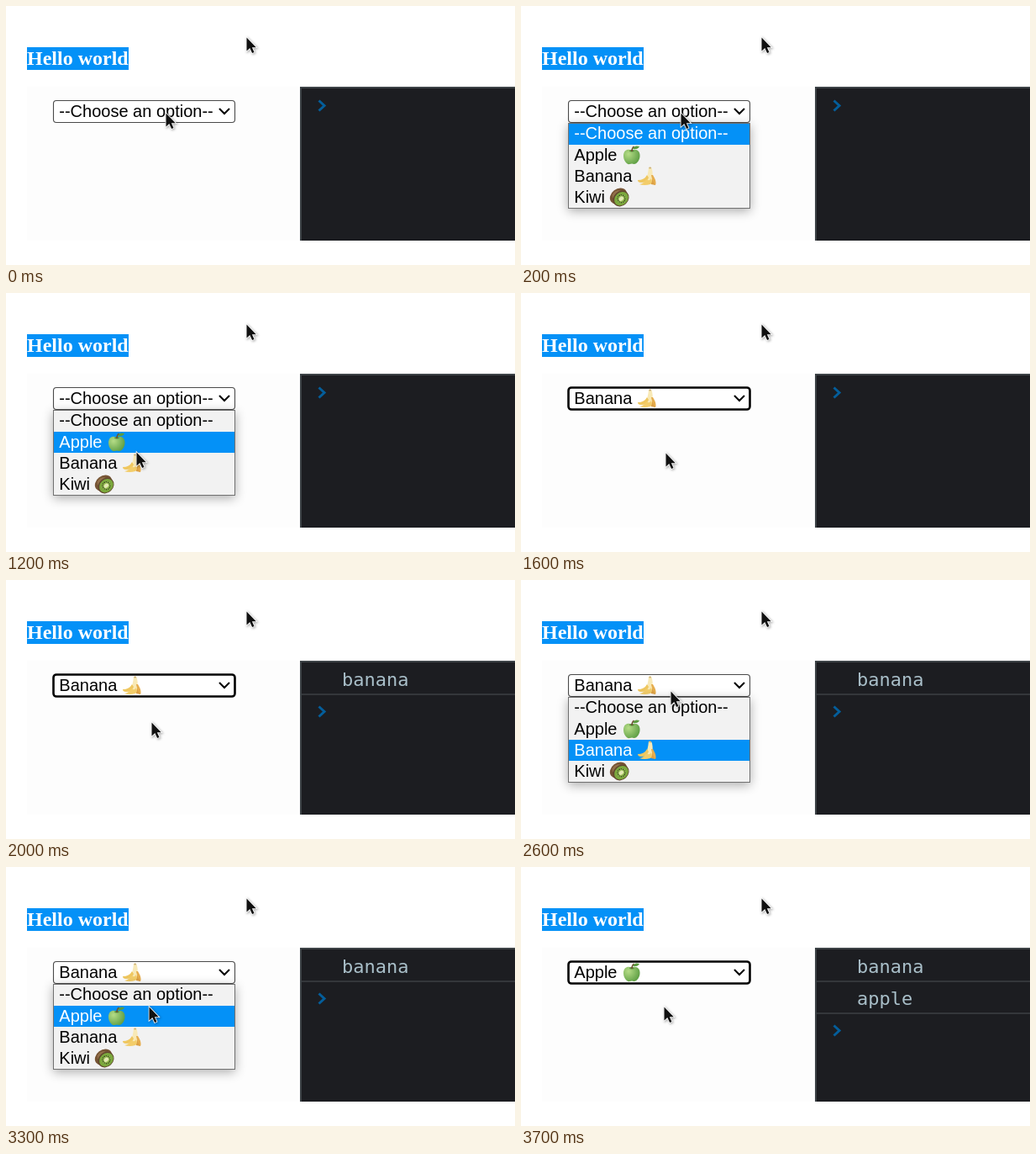
An HTML page with a canvas for the animation above (4.1 s loop, 606x308 px).

```html
<!DOCTYPE html>
<html lang="en">
<head>
<meta charset="utf-8">
<title>Select demo</title>
<style>
html, body { margin: 0; width: 100%; height: 100%; overflow: hidden; background: #fff; }
canvas { display: block; }
</style>
</head>
<body>
<canvas id="stage" width="606" height="308"></canvas>
<script>
const ctx = document.getElementById('stage').getContext('2d');
const LOOP = 4100;
const BLUE = '#0491f7';
const SANS = '20px "Liberation Sans", Arial, sans-serif';
const MONO = '22px "DejaVu Sans Mono", monospace';
const SERIF = 'bold 24px "Liberation Serif", "Times New Roman", serif';

// Pointer tip: time, x, y
const pointer = [
  [0, 190, 127], [400, 189, 130], [500, 186, 138], [600, 180, 146],
  [700, 173, 153], [800, 165, 172], [900, 160, 193], [1100, 156, 217],
  [1200, 155, 189], [1300, 172, 190], [2000, 173, 169], [2100, 175, 155],
  [2200, 177, 141], [2300, 178, 132], [2700, 178, 131], [2900, 174, 160],
  [3000, 176, 141], [3300, 170, 166]
];
// Highlighted option: time, index (-1 = list closed)
const hover = [
  [0, -1], [200, 0], [800, 1], [900, 2], [1100, 3], [1200, 1], [1300, 2],
  [1600, -1], [2500, 2], [3300, 1], [3600, -1]
];
const chosen = [[0, 0], [1600, 2], [3600, 1]];
const logs = [[1700, 'banana'], [3700, 'apple']];

const options = [
  { text: '--Choose an option--' },
  { text: 'Apple', icon: apple, iconX: 120 },
  { text: 'Banana', icon: banana, iconX: 138 },
  { text: 'Kiwi', icon: kiwi, iconX: 105 }
];
const baselines = [158, 184, 209, 234];

const at = (keys, t) => keys.filter(k => k[0] <= t).pop();

function rect(x, y, w, h, color) {
  ctx.fillStyle = color;
  ctx.fillRect(x, y, w, h);
}

function text(str, x, y, font, color) {
  ctx.font = font;
  ctx.fillStyle = color;
  ctx.fillText(str, x, y);
}

function shape(d, fill) {
  ctx.fillStyle = fill;
  ctx.fill(new Path2D(d));
}

function line(d, color, width) {
  ctx.strokeStyle = color;
  ctx.lineWidth = width;
  ctx.stroke(new Path2D(d));
}

function oval(x, y, rx, ry, turn, color) {
  ctx.beginPath();
  ctx.ellipse(x, y, rx, ry, turn, 0, 7);
  ctx.fillStyle = color;
  ctx.fill();
}

function glow(x, y, r, inner, outer) {
  const g = ctx.createRadialGradient(x, y, 0, x, y, r);
  g.addColorStop(0, inner);
  g.addColorStop(1, outer);
  return g;
}

// Icons sit in a 24 x 24 box
function apple() {
  shape('M12 7C8 4 2 6 2 13C2 19 6 24 9.500 23Q12 22 14.500 23C18 23 22 18 21.500 12C21 6 16 5 12 7Z',
    glow(8, 11, 14, '#b5dc86', '#5f9f45'));
  oval(12, 7.3, 3, 1.2, 0, '#5c9440');
  line('M12 8Q12 4 14.500 2', '#6d4c32', 1.6);
  shape('M13 5Q15 0 21 2Q19 6 13 5Z', '#5a9a3f');
}

function banana() {
  shape('M13 12L22 17L22 23L17 22Z', '#dca045');
  shape('M14 2Q17 1 18 4Q20 13 17 20Q14 23 9 21Q13 13 14 2Z', '#f8e9b6');
  shape('M12 11Q9 17 1 17Q1 20 5 20Q12 20 14 14Z', '#efc75f');
  shape('M11 16Q9 21 3 22Q9 24 16 22Q19 20 17 15Q15 19 11 16Z', '#f3cd69');
  shape('M17 11Q18 18 22 23Q24 19 19 11Z', '#e6ad4d');
  oval(15.7, 2.5, 1.5, 0.9, 0, '#cdb27a');
}

function kiwi() {
  oval(11, 11, 11, 8.5, -0.65, '#765434');
  oval(9, 9, 6, 4, -0.65, '#93704a');
  oval(14, 14, 10.3, 8.6, -0.75, '#60462d');
  oval(14.4, 14.2, 9, 7.4, -0.75, '#7ba83d');
  oval(14.4, 14.2, 5.6, 4.4, -0.75, '#9bc255');
  for (let i = 0; i < 12; i++) {
    const a = i * Math.PI / 6;
    oval(14.4 + 4.4 * Math.cos(a), 14.2 + 4.4 * Math.sin(a), 0.8, 0.8, 0, '#344020');
  }
  oval(14.4, 14.2, 2.9, 2.2, -0.75, '#e3e8b4');
}

function label(option, y, color) {
  text(option.text, 63.3, y, SANS, color);
  if (!option.icon) return;
  ctx.save();
  ctx.translate(option.iconX, y - 19);
  option.icon();
  ctx.restore();
}

function selectBox(value, focused) {
  ctx.beginPath();
  ctx.roundRect(56.5, 112.5, 216, 26, 3.5);
  ctx.fillStyle = '#fff';
  ctx.fill();
  ctx.strokeStyle = focused ? '#000' : '#4a4a4a';
  ctx.lineWidth = focused ? 2.6 : 1.1;
  ctx.stroke();
  label(options[value], 132, '#000');
  line('M254 122L260 128L266 122', '#000', 2);
}

function list(active) {
  ctx.save();
  ctx.shadowColor = 'rgba(0,0,0,.32)';
  ctx.shadowBlur = 12;
  ctx.shadowOffsetY = 3;
  rect(56, 139, 217, 102, '#707070');
  ctx.restore();
  rect(57, 140, 215, 100, '#f2f2f2');
  rect(57, 140 + 25 * active, 215, 25, BLUE);
  options.forEach((o, i) => label(o, baselines[i], i === active ? '#fff' : '#000'));
}

function consolePane(t) {
  rect(350, 96, 256, 183, '#3d4347');
  rect(352, 98, 254, 181, '#1c1d21');
  const shown = logs.filter(l => l[0] <= t);
  shown.forEach(([, word], i) => {
    text(word, 400, 126 + 38 * i, MONO, '#a9bfc9');
    rect(352, 135 + 38 * i, 254, 2, '#34373b');
  });
  const y = 112.5 + 38 * shown.length;
  line(`M372.500 ${y}l6.500 6l-6.500 6`, '#045e9b', 3);
}

function arrow(x, y) {
  ctx.save();
  ctx.translate(x, y);
  ctx.shadowColor = 'rgba(0,0,0,.4)';
  ctx.shadowBlur = 3;
  ctx.shadowOffsetX = ctx.shadowOffsetY = 1;
  const d = 'M0 0V16L3.800 12.600L6.600 18.500L9 17.400L6.400 11.700H11.300Z';
  line(d, '#fff', 1.6);
  ctx.shadowColor = 'transparent';
  shape(d, '#111');
  ctx.restore();
}

function draw(now) {
  const t = now % LOOP;
  const active = at(hover, t)[1];
  const value = at(chosen, t)[1];
  const [, x, y] = at(pointer, t);

  rect(0, 0, 606, 308, '#fff');
  rect(25, 49, 121, 27, BLUE);
  text('Hello world', 25, 70, SERIF, '#fff');
  rect(25, 96, 325, 183, '#fdfdfd');
  consolePane(t);
  selectBox(value, value > 0 && active < 0);
  if (active >= 0) list(active);
  arrow(286.5, 37.5);
  arrow(x + 0.5, y + 0.5);
  requestAnimationFrame(draw);
}
requestAnimationFrame(draw);
</script>
</body>
</html>
```
